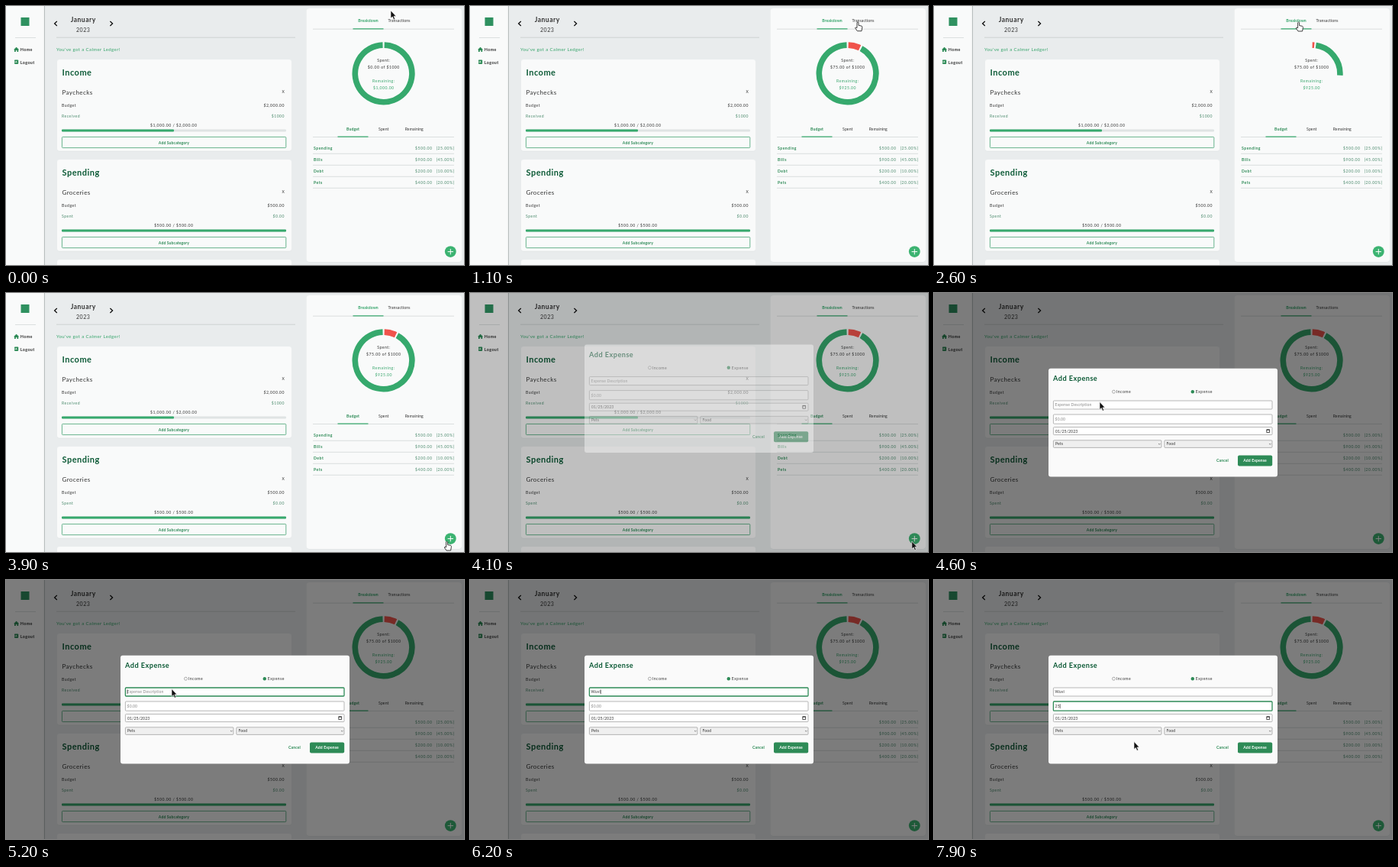
An HTML page that plays this animation: 600x339 px, repeating every 8 s.

```html
<!DOCTYPE html>
<html lang="en">
<head>
<meta charset="utf-8">
<title>Budget planner</title>
<style>
html, body { margin: 0; height: 100%; overflow: hidden; }
svg { display: block; width: 100%; height: 100%; }
text { font: 5.1px Lato, sans-serif; letter-spacing: .5px; fill: #333; white-space: pre; }
.mid { text-anchor: middle; }
.end { text-anchor: end; }
.bold { font-weight: 700; }
.tight { letter-spacing: .1px; }
.title { font-size: 11px; font-weight: 700; fill: #0c5a36; }
.sub { font-size: 8px; letter-spacing: .4px; }
.nav { font-size: 5.4px; font-weight: 700; letter-spacing: .35px; }
.green { fill: #36a56b; }
.deep { fill: #2e8b57; }
.soft { fill: #4a8a6c; }
.hint { fill: #888; letter-spacing: .1px; }
.white { fill: #fff; }
</style>
</head>
<body>
<svg id="stage" viewBox="0 0 600 339" preserveAspectRatio="none"></svg>
<script>
const LOOP = 8000, STEP = 100;
const GREEN = '#36a96d', DEEP = '#2e8b57', PAPER = '#f9fafa', RULE = '#d3d8d8';
const stage = document.getElementById('stage');

const text = (x, y, str, cls = '', id = '') => `<text x="${x}" y="${y}" class="${cls}" id="${id}">${str}</text>`;
const rect = (x, y, w, h, fill, extra = '') => `<rect x="${x}" y="${y}" width="${w}" height="${h}" fill="${fill}" ${extra}/>`;
const path = (d, stroke, width = 1, extra = '') => `<path d="${d}" fill="none" stroke="${stroke}" stroke-width="${width}" ${extra}/>`;
const rule = (x1, x2, y, color = RULE, width = .8) => path(`M${x1} ${y}H${x2}`, color, width);
const group = (id, ...parts) => `<g id="${id}">${parts.join('')}</g>`;

function card(top, title, name, verb, budget, actual, total, share) {
  return `<g transform="translate(0 ${top})">` + [
    rect(67, 0, 307, 120.5, '#dfe3e4', 'rx="3"'),
    rect(67, 0, 307, 119.8, PAPER, 'rx="3"'),
    text(73.5, 21, title, 'title'),
    text(73.5, 46, name, 'sub'), text(363.5, 44, 'X', 'mid'),
    text(73, 62, 'Budget'), text(365, 62, budget, 'end'),
    text(73, 75.5, verb, 'soft'), text(365, 75.5, actual, 'end soft'),
    text(219.8, 88, total, 'mid'),
    rect(73, 91.6, 294, 3, '#dfe4e4', 'rx="1"'),
    rect(73, 91.6, 294 * share, 3, GREEN, 'rx="1"'),
    rect(73.4, 101.4, 293.4, 14.2, 'none', 'rx="1" stroke="#45a273" stroke-width=".8"'),
    text(220, 110.5, 'Add Subcategory', 'mid bold tight deep'),
  ].join('') + '</g>';
}

const budgetRows = [['Spending', 500], ['Bills', 900], ['Debt', 200], ['Pets', 400]];
const budgetRow = ([name, sum], i) =>
  text(403, 188 + 15 * i, name, 'bold deep') +
  text(558.5, 188 + 15 * i, `$${sum}.00`, 'end soft') +
  text(587.5, 188 + 15 * i, `(${(sum / 20).toFixed(2)}%)`, 'end soft') +
  rule(402, 587, 193.3 + 15 * i);

const sidebar = [
  rect(0, 0, 50, 339, PAPER),
  path('M50.4 0V339', '#a3aaaa', .8),
  rect(19.5, 15, 11, 11, '#2f9160'),
  rule(12, 39, 41.5),
  `<path d="M10 57.2 13.6 53.8 17.2 57.2H16.2V60H14.4V58H12.8V60H11V57.2Z" fill="${DEEP}"/>`,
  text(18.8, 59, 'Home', 'nav'),
  rect(11, 70.5, 5.2, 5.4, DEEP, 'rx=".8"'),
  path('M11 73.2H14M13 72 14.2 73.2 13 74.4', '#fff', .7),
  text(18.8, 75.6, 'Logout', 'nav'),
];

const main = [
  path('M66.8 20 63.6 23 66.8 26M136.4 20 139.6 23 136.4 26', '#111', 1.3),
  text(101.2, 21.2, 'January', 'mid bold', 'month'),
  text(101.2, 33.6, '2023', 'mid', 'year'),
  rule(66, 379, 41.2, '#c6cccc'),
  text(66, 59, 'You\'ve got a Calmer Ledger!', 'green', 'slogan'),
  card(70, 'Income', 'Paychecks', 'Received', '$2,000.00', '$1000', '$1,000.00 / $2,000.00', .5),
  card(201, 'Spending', 'Groceries', 'Spent', '$500.00', '$0.00', '$500.00 / $500.00', 1),
  rect(67, 332, 307, 10, PAPER, 'rx="3"'),
];

const panel = [
  rect(393.5, 3, 203.5, 332.6, '#dde1e2', 'rx="4"'),
  rect(393.5, 3, 203.5, 332, PAPER, 'rx="4"'),
  text(474.5, 21.2, 'Breakdown', 'mid', 'tabBreakdown'),
  text(515, 21.2, 'Transactions', 'mid', 'tabTransactions'),
  rule(402, 587, 30.2),
  `<rect id="tabLine" y="29.3" width="40" height="1.2" fill="${GREEN}"/>`,
  group('breakdown',
    path('', '#f0544c', 7.6, 'id="spentArc"'), path('', GREEN, 7.6, 'id="leftArc"'),
    text(494.8, 72.8, 'Spent:', 'mid'), text(494.8, 81.6, '', 'mid', 'spent'),
    text(494.8, 99.6, 'Remaining:', 'mid green'), text(494.8, 108.8, '', 'mid green', 'left'),
    text(454.5, 162.6, 'Budget', 'mid bold tight deep'),
    text(494.8, 162.6, 'Spent', 'mid tight'), text(534.8, 162.6, 'Remaining', 'mid tight'),
    rule(402, 587, 171.5), rule(434.5, 474.5, 171.2, GREEN, 1.2),
    ...budgetRows.map(budgetRow)),
  group('transactions',
    text(403, 46, 'Dog food', 'bold deep'), text(587.5, 46, '$75.00', 'end soft'), rule(402, 587, 51.3)),
  '<circle cx="582.3" cy="321.6" r="7.4" fill="#3cb371"/>',
  path('M578.6 321.6H586M582.3 317.9V325.3', '#fff', 1),
];

const field = (y, h, id) => rect(156.4, y, 286.6, h, '#fff', `rx="1" id="${id}"`);
const select = (x, w, label) =>
  rect(x, 192.8, w, 9.6, '#efefef', 'rx="1" stroke="#9a9a9a" stroke-width=".7"') +
  text(x + 2.6, 199.4, label, 'tight') +
  path(`M${x + w - 4} 197 l1.3 1.3 1.3 -1.3`, '#444', .6);

const modal = [
  rect(150, 98.8, 300, 141.6, '#fafafa', 'rx="3"'),
  text(156, 115, 'Add Expense', 'title', 'heading'),
  '<circle cx="235.5" cy="129.2" r="2" fill="#fff" stroke="#777" stroke-width=".6"/>',
  text(238.8, 131.3, 'Income'),
  `<circle cx="338.8" cy="129.2" r="2.2" fill="${DEEP}"/>`,
  text(342.8, 131.3, 'Expense'),
  field(141, 11, 'nameBox'), text(158.6, 148.4, '', '', 'name'),
  field(159, 12.2, 'sumBox'), text(158.6, 167.3, '', '', 'sum'),
  `<rect id="caret" width=".6" height="6" fill="#111"/>`,
  rect(156.4, 175.6, 286.6, 10, '#fff', 'rx="1" stroke="#9a9a9a" stroke-width=".7"'),
  text(159, 182.5, '01/25/2023', 'tight'),
  path('M435.8 178.8H439.6V182.6H435.8ZM435.8 179.2H439.6', '#222', .8),
  select(156.4, 141.6, 'Pets'), select(301.8, 141.2, 'Food'),
  text(378, 221.4, 'Cancel', 'mid bold tight deep'),
  rect(398, 212.6, 45.2, 14, DEEP, 'rx="2"'),
  text(420.6, 221.4, 'Add Expense', 'mid bold white tight'),
];

stage.innerHTML = [
  rect(0, 0, 600, 339, '#e9eced'), ...sidebar, ...main, ...panel,
  rect(0, 0, 600, 339, '#000', 'id="shade"'),
  group('modal', ...modal),
  `<g id="pointer" stroke="#fff" stroke-width=".6" fill="#111">
    <path id="arrow" d="M0 0V10L2.3 8 3.9 11.8 5.6 11 4 7.4H7Z"/>
    <path id="hand" fill="#fff" stroke="#111" stroke-width=".8"
      d="M-1 .8Q0 -.8 1 .8V4.6L5 5.4Q6 5.8 5.8 7.4L5 12H-.6L-3.4 8Q-3.2 6.6 -1 7.8Z"/></g>`,
].join('');

const el = Object.fromEntries([...stage.querySelectorAll('[id]')].filter(n => n.id).map(n => [n.id, n]));
el.month.style.fontSize = '8.5px';
el.year.style.fontSize = '7px';
el.slogan.style.cssText = 'font-size:6px;letter-spacing:.4px';
el.heading.style.cssText = 'font-size:9.2px;letter-spacing:.45px';

const clamp = v => Math.min(1, Math.max(0, v));
const progress = (t, start, length) => clamp((t - start) / length);
const easeOutQuart = p => 1 - (1 - p) ** 4;
const easeOut = p => 1 - (1 - p) ** 1.75;
const show = (node, on) => node.setAttribute('display', on ? 'inline' : 'none');
const set = (node, attrs) => { for (const k in attrs) node.setAttribute(k, attrs[k]); };

function arc(from, to) {
  const pad = .028, r = 37.3, a = from + pad, b = to - pad;
  if (b <= a) return '';
  const point = q => `${494.6 + r * Math.sin(q)} ${88.4 - r * Math.cos(q)}`;
  return `M${point(a)}A${r} ${r} 0 ${b - a > Math.PI ? 1 : 0} 1 ${point(b)}`;
}

// Pointer stops: time, x, y
const stops = [
  [0, 504, 6], [100, 504, 7], [900, 508, 20], [1200, 508, 21], [1400, 516, 21.5], [1600, 516, 21.5],
  [1900, 477.6, 21], [2700, 477.6, 21], [3500, 577.6, 325], [4000, 577.6, 325], [4100, 578.8, 325],
  [4500, 217, 142.5], [7600, 217, 142.5], [7900, 262, 211.5],
];
function pointerAt(t) {
  const i = stops.findIndex(s => s[0] > t);
  if (i < 0) return stops[stops.length - 1].slice(1);
  const [t0, x0, y0] = stops[i - 1], [t1, x1, y1] = stops[i];
  let p = (t - t0) / (t1 - t0);
  p = p * p * (3 - 2 * p);
  return [x0 + (x1 - x0) * p, y0 + (y1 - y0) * p];
}

const nameKeys = [5500, 5700, 5900, 6200], sumKeys = [7500, 7600];
const typed = (word, keys, t) => word.slice(0, keys.filter(k => k <= t).length);

function fill(node, value, hint) {
  node.textContent = value || hint;
  node.setAttribute('class', value ? 'tight' : 'hint');
}
const outline = (node, on) => set(node, { stroke: on ? DEEP : '#9a9a9a', 'stroke-width': on ? 1.3 : .7 });

function drawPanel(t) {
  const listing = t >= 1600 && t < 2526;
  show(el.breakdown, !listing);
  show(el.transactions, listing);
  el.tabBreakdown.setAttribute('class', 'mid tight bold ' + (listing ? '' : 'green'));
  el.tabTransactions.setAttribute('class', 'mid tight ' + (listing ? 'green bold' : ''));
  el.tabLine.setAttribute('x', listing ? 495 : 454.5);

  const sweep = 2 * Math.PI * (t < 2526 ? 1 : easeOutQuart(progress(t, 2526, 1000)));
  const split = sweep * .075 * easeOutQuart(progress(t, 60, 1000));
  el.spentArc.setAttribute('d', arc(0, split));
  el.leftArc.setAttribute('d', arc(split, sweep));
  el.spent.textContent = t < 100 ? '$0.00 of $1000' : '$75.00 of $1000';
  el.left.textContent = t < 100 ? '$1,000.00' : '$925.00';
}

function drawModal(t) {
  const fade = progress(t, 4030, 150);
  el.shade.setAttribute('opacity', fade / 2);
  set(el.modal, { opacity: fade, transform: `translate(0 ${-50 * (1 - easeOut(progress(t, 4030, 300)))})` });

  const onName = t >= 4800 && t < 7300, onSum = t >= 7300;
  fill(el.name, typed('Wuvi', nameKeys, t), 'Expense Description');
  fill(el.sum, typed('25', sumKeys, t), '$0.00');
  outline(el.nameBox, onName);
  outline(el.sumBox, onSum);

  const active = onSum ? el.sum : el.name;
  const lastKey = Math.max(...[4800, 7300, ...nameKeys, ...sumKeys].filter(k => k <= t));
  const width = active.getAttribute('class') === 'hint' ? 0 : active.getComputedTextLength();
  set(el.caret, { x: 158.7 + width, y: onSum ? 162.2 : 143.4 });
  show(el.caret, (onName || onSum) && (t - lastKey) % 1000 < 500);
}

function drawPointer(t) {
  const [x, y] = pointerAt(t);
  const overLink = (t >= 900 && t < 2800) || (t >= 3500 && t < 4050);
  el.pointer.setAttribute('transform', `translate(${x} ${y})`);
  show(el.pointer, t < 5400 || t >= 7700);
  show(el.hand, overLink);
  show(el.arrow, !overLink);
}

function frame(now) {
  const t = Math.floor(now % LOOP / STEP) * STEP;
  drawPanel(t);
  drawModal(t);
  drawPointer(t);
  requestAnimationFrame(frame);
}
frame(performance.now());
</script>
</body>
</html>
```
